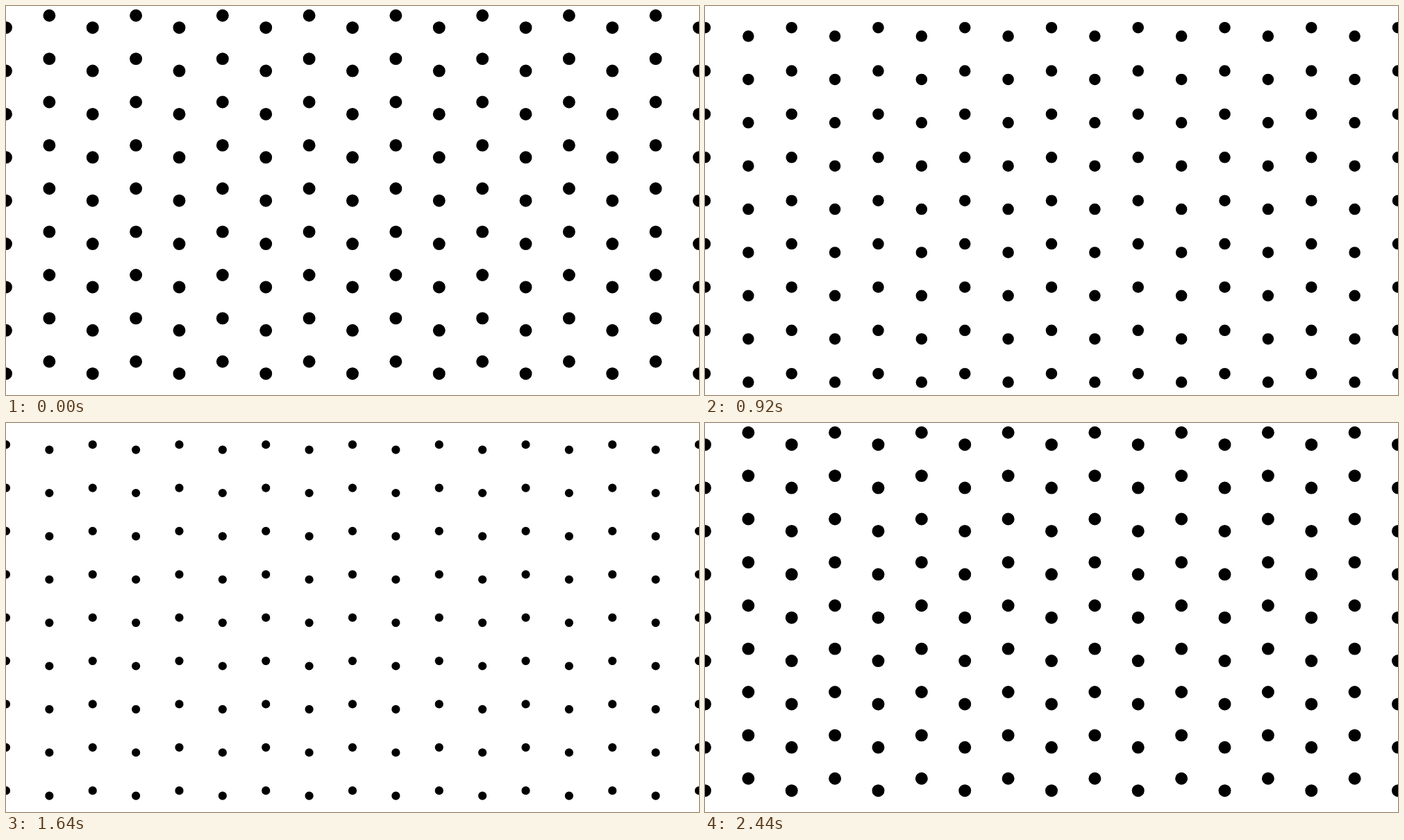
These frames come from a looping animation (998 px wide and 561 px high, 2480 ms). An HTML page with a canvas:

```html
<!DOCTYPE html>
<html lang="en">
<head>
<meta charset="utf-8">
<title>Bouncing dots</title>
<style>
  html, body { margin: 0; width: 100%; height: 100%; overflow: hidden; background: #fff; }
  canvas { display: block; }
</style>
</head>
<body>
<canvas id="stage" width="998" height="561"></canvas>
<script>
const ctx = document.getElementById('stage').getContext('2d');
const PERIOD = 2480, HALF = PERIOD / 2, LEAD = 26;
const CELL = 998 / 16, ROWS = 9, COLS = 17;
const R_MAX = 9, R_MIN = 2, SHRINK = 600;

const smooth = u => (1 - Math.cos(Math.PI * u)) / 2;

// Time since the upper turning point, mirrored on the way back up.
function swingTime(now) {
  const t = (now + LEAD) % PERIOD;
  return t < HALF ? t : PERIOD - t;
}

function offsetAt(d) {
  const a = Math.PI * d / HALF;
  return -17.45 * Math.cos(a) - Math.sin(a) ** 2;
}

// Dots shrink evenly, then grow back quickly and settle.
function radiusAt(d) {
  const size = d < SHRINK
    ? 1 - smooth(d / SHRINK)
    : smooth(1 - ((HALF - d) / (HALF - SHRINK)) ** 2);
  return R_MIN + (R_MAX - R_MIN) * size;
}

function draw(now) {
  const d = swingTime(now);
  const offset = offsetAt(d), radius = radiusAt(d);
  ctx.fillStyle = '#fff';
  ctx.fillRect(0, 0, 998, 561);
  ctx.fillStyle = '#000';
  ctx.beginPath();
  for (let col = 0; col < COLS; col++) {
    for (let row = 0; row < ROWS; row++) {
      const x = col * CELL;
      const y = (row + 0.5) * CELL + (col % 2 ? offset : 0);
      ctx.moveTo(x + radius, y);
      ctx.arc(x, y, radius, 0, 2 * Math.PI);
    }
  }
  ctx.fill();
}

const start = performance.now();
function tick() {
  draw(performance.now() - start);
  requestAnimationFrame(tick);
}
tick();
</script>
</body>
</html>
```
